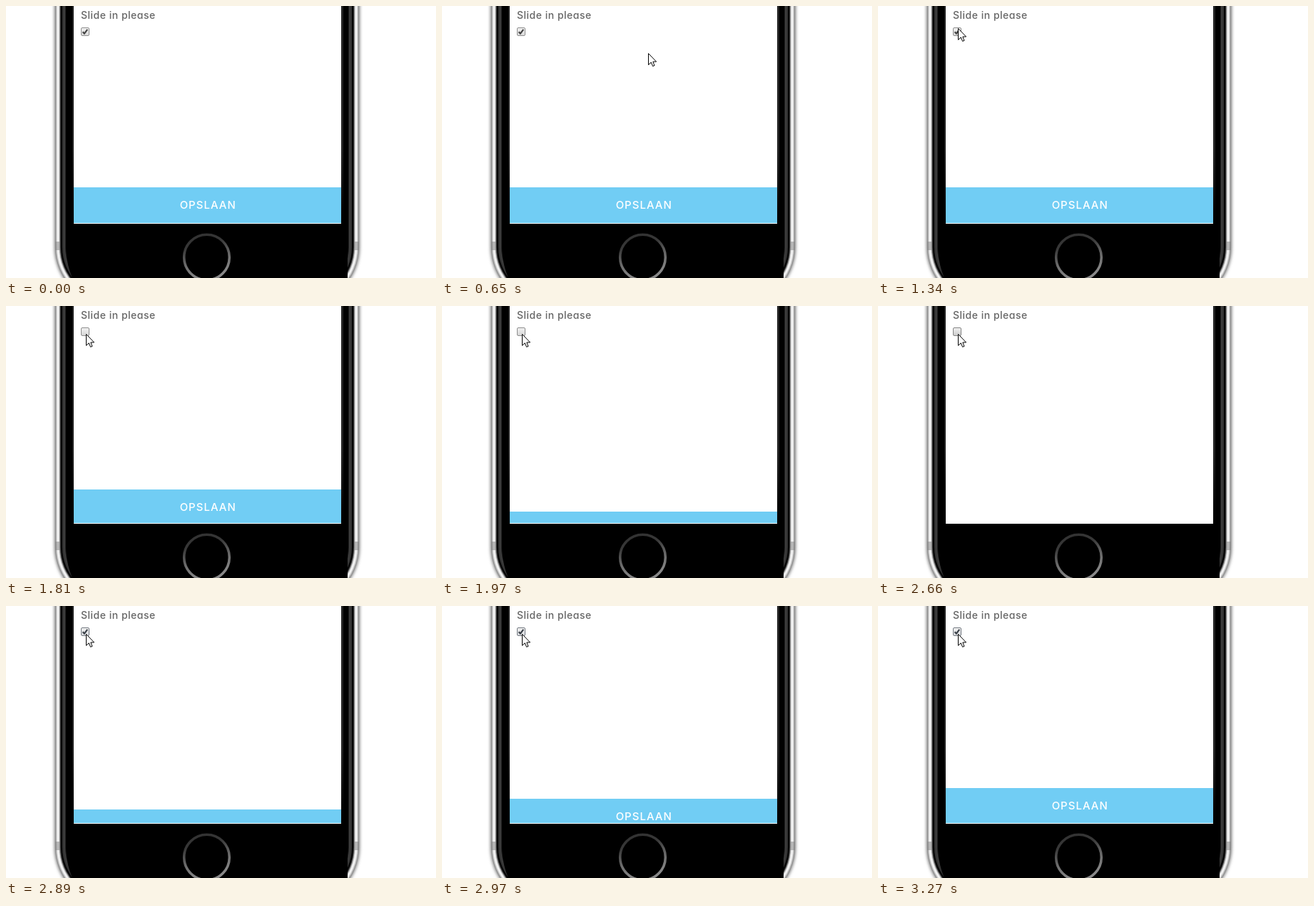
Recreate the animation shown at these times as an HTML page. Size 603 by 381 pixels, loop 4040 ms.

```html
<!DOCTYPE html>
<html lang="nl">
<head>
<meta charset="utf-8">
<title>Slide in</title>
<style>
  html, body { margin: 0; width: 100%; height: 100%; overflow: hidden; background: #fff; }
  svg { display: block; width: 603px; height: 381px; }
  text { font-family: Inter, "DejaVu Sans", sans-serif; font-weight: 500; font-feature-settings: "cv11"; }
  .label { font-size: 14px; letter-spacing: .5px; fill: #666; }
  .save { font-size: 15px; letter-spacing: 1px; fill: #fff; text-anchor: middle; }
</style>
</head>
<body>
<svg viewBox="0 0 603 381">
  <defs>
    <filter id="soft" x="-5%" width="110%"><feGaussianBlur stdDeviation="2"/></filter>
    <linearGradient id="ring" x1="0" y1="0" x2=".25" y2="1">
      <stop offset="0" stop-color="#303030"/>
      <stop offset=".3" stop-color="#383838"/>
      <stop offset=".65" stop-color="#6c6c6c"/>
      <stop offset="1" stop-color="#8a8a8a"/>
    </linearGradient>
    <linearGradient id="face" x1="0" y1="0" x2="0" y2="1">
      <stop offset="0" stop-color="#f1f1f1"/>
      <stop id="faceEnd" offset="1" stop-color="#dadada"/>
    </linearGradient>
    <linearGradient id="fade" x1="0" y1="0" x2="0" y2="1">
      <stop offset="0" stop-color="#000" stop-opacity="0"/>
      <stop offset="1" stop-color="#000"/>
    </linearGradient>
    <clipPath id="screen"><path d="M95 0H470V304H95Z"/></clipPath>
  </defs>

  <g id="phone"></g>
  <path d="M69 330H76V342H69ZM488 330H495V342H488Z" fill="#808080" opacity=".5"/>
  <path d="M85 305H479V381H93Q85 362 85 345Z"/>
  <path d="M93 0H95V305H93ZM470 0H473V305H470Z" fill="#242424"/>
  <path d="M93 200H95V305H93ZM470 200H473V305H470Z" fill="url(#fade)"/>
  <circle cx="281.5" cy="352" r="31.8" fill="#000" stroke="url(#ring)" stroke-width="3.6"/>
  <path d="M95 0H470V305H95Z" fill="#fff"/>

  <text class="label" x="105" y="18">Slide in please</text>
  <rect id="box" x="105.5" y="30.5" width="11" height="11" rx="1.5" fill="url(#face)"/>
  <path id="tick" d="M107.6 36.2L109.9 38.6L114.2 32.9" fill="none" stroke-width="2.2"/>

  <g clip-path="url(#screen)">
    <g id="bar">
      <path d="M95 254H470V304H95Z" fill="#71cdf4"/>
      <text class="save" x="283.2" y="284">OPSLAAN</text>
    </g>
  </g>

  <path id="cursor" d="M.5 .5V16.4L4.3 12.9L6.6 18.4L9 17.4L6.8 12H11.6Z" fill="#fff" stroke="#000"/>
</svg>

<script>
const LOOP = 4040;
const $ = id => document.getElementById(id);

// Casing: nested rounded shells, [inset, colour].
const shells = [
  [0, "#8f8f8f"], [1, "#b9b9b9"], [2, "#dcdcdc"], [3, "#f6f6f6"], [5, "#cfcfcf"],
  [6, "#8c8c8c"], [7, "#2c2c2c"], [8, "#050505"], [10, "#343434"], [12, "#3c3c3c"],
  [14, "#1c1c1c"], [15, "#000"]
];
function shell(inset, fill, filter) {
  const r = document.createElementNS("http://www.w3.org/2000/svg", "rect");
  const set = { x: 69 + inset, y: -120, width: 426 - 2 * inset, height: 538 - inset, rx: 80 - inset, fill };
  if (filter) set.filter = filter;
  for (const k in set) r.setAttribute(k, set[k]);
  $("phone").append(r);
}
shell(-1, "#777", "url(#soft)");
shells.forEach(([inset, fill]) => shell(inset, fill));

// [time, x, y] of the pointer tip
const pointer = [
  [420, 488, 303], [500, 428, 216], [580, 352, 118], [650, 289, 66], [730, 222, 47],
  [800, 172, 40], [880, 139, 36], [960, 133, 32], [1040, 129, 29], [1190, 123, 29],
  [1340, 112, 31], [1500, 112, 38], [1650, 112, 39]
];

// [time, ticked, border, lower face colour, tick colour]
const checks = [
  [0, true, "#8e8e8e", "#dadada", "#444"],
  [1650, true, "#8e8e8e", "#cecece", "#444"],
  [1810, false, "#8e8e8e", "#d6d6d6", "#444"],
  [2660, false, "#858585", "#cbcbcb", "#444"],
  [2810, true, "#747a82", "#d8dade", "#3a4048"]
];

const ticks = [0, 80, 160, 230, 310, 390, 470];
const slides = [[1810, 1770, 0, 50], [2810, 2770, 50, 0]];

// cubic-bezier(.25, .1, .25, 1), solved by bisection
function ease(p) {
  if (p <= 0) return 0;
  if (p >= 1) return 1;
  const curve = (a, b, u) => 3 * a * u * (1 - u) ** 2 + 3 * b * u * u * (1 - u) + u ** 3;
  let lo = 0, hi = 1;
  for (let i = 0; i < 24; i++) {
    const mid = (lo + hi) / 2;
    if (curve(.25, .25, mid) < p) lo = mid; else hi = mid;
  }
  return curve(.1, 1, lo);
}

const latest = (table, t) => table.filter(row => row[0] <= t).pop();

function barOffset(t) {
  const slide = latest(slides, t);
  if (!slide) return 0;
  const [first, start, from, to] = slide;
  const shown = first + ticks.filter(d => first + d <= t).pop();
  return Math.round(from + (to - from) * ease((shown - start) / 500));
}

function draw(t) {
  const tip = latest(pointer, t);
  $("cursor").style.display = tip ? "" : "none";
  if (tip) $("cursor").setAttribute("transform", `translate(${tip[1]} ${tip[2]})`);

  const [, ticked, border, face, mark] = latest(checks, t);
  $("box").setAttribute("stroke", border);
  $("faceEnd").setAttribute("stop-color", face);
  $("tick").setAttribute("stroke", mark);
  $("tick").style.display = ticked ? "" : "none";

  $("bar").setAttribute("transform", `translate(0 ${barOffset(t)})`);
}

const begin = performance.now();
function loop() {
  draw((performance.now() - begin) % LOOP);
  requestAnimationFrame(loop);
}
loop();
</script>
</body>
</html>
```
